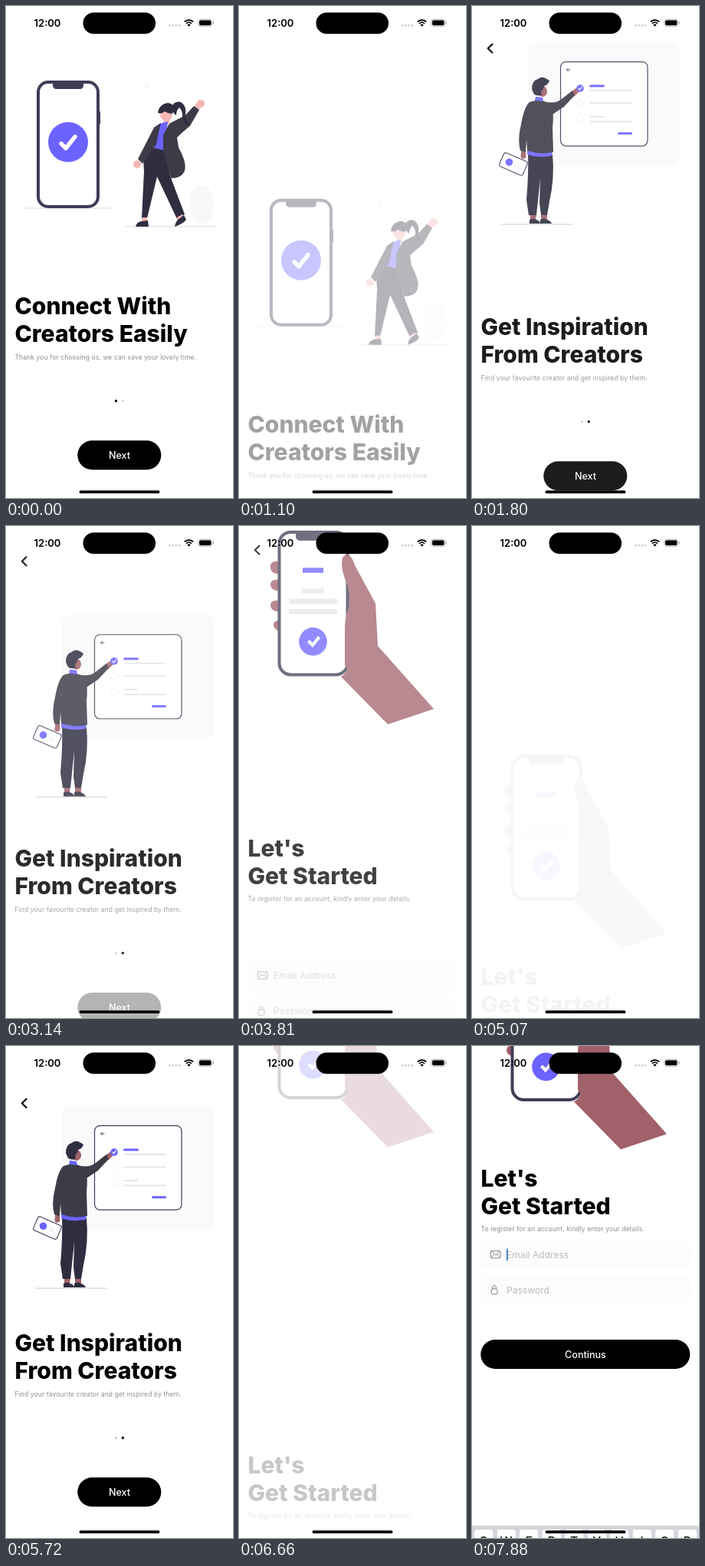
Animation of 296 by 640 pixels, one loop 7.99 s. Source, as an HTML page with a canvas:

```html
<!DOCTYPE html>
<html lang="en">
<head>
<meta charset="utf-8">
<title>Onboarding</title>
<style>
  html, body { margin: 0; width: 100%; height: 100%; overflow: hidden; background: #fff; }
  canvas { display: block; width: 296px; height: 640px; }
</style>
</head>
<body>
<canvas id="stage"></canvas>
<script>
const W = 296, H = 640, LOOP = 7990;
const FONT = 'Inter, "Liberation Sans", sans-serif';
const VIOLET = '#6c63ff', SLATE = '#3f3d56', NIGHT = '#2f2e41', COAT = '#3d3b47';
const PINK = '#f6b6b6', SKIN = '#a0616a', PALE = '#e6e6e6', FAINT = '#f8f8f8';

const scale = Math.max(1, window.devicePixelRatio || 1);
const stage = document.getElementById('stage');
const scratch = document.createElement('canvas');
for (const c of [stage, scratch]) { c.width = W * scale; c.height = H * scale; }
const screen = stage.getContext('2d'), g = scratch.getContext('2d');

// Shape helpers
function shape(d, fill) { g.fillStyle = fill; g.fill(new Path2D(d)); }
function line(d, color, width = 1) {
  g.strokeStyle = color; g.lineWidth = width; g.lineCap = g.lineJoin = 'round';
  g.stroke(new Path2D(d));
}
function box(x, y, w, h, r, fill, stroke, width = 1) {
  g.beginPath(); g.roundRect(x, y, w, h, r);
  if (fill) { g.fillStyle = fill; g.fill(); }
  if (stroke) { g.strokeStyle = stroke; g.lineWidth = width; g.stroke(); }
}
function oval(x, y, rx, ry, fill) {
  g.beginPath(); g.ellipse(x, y, rx, ry, 0, 0, 7); g.fillStyle = fill; g.fill();
}
function dot(x, y, r, fill) { oval(x, y, r, r, fill); }
function text(s, x, y, size, weight, color, align = 'left', spacing = 0) {
  g.font = `${weight} ${size}px ${FONT}`;
  g.textAlign = align; g.letterSpacing = spacing + 'px'; g.fillStyle = color;
  g.fillText(s, x, y);
}

// Paints a group off screen so that it fades as one
function layer(draw, dy = 0, alpha = 1) {
  if (alpha <= 0.004) return;
  g.setTransform(1, 0, 0, 1, 0, 0);
  g.clearRect(0, 0, scratch.width, scratch.height);
  g.setTransform(scale, 0, 0, scale, 0, dy * scale);
  draw();
  screen.globalAlpha = Math.min(1, alpha);
  screen.drawImage(scratch, 0, 0);
  screen.globalAlpha = 1;
}

function woman() {
  dot(184, 104, 4, FAINT); dot(154, 189, 2, FAINT); dot(252, 180, 2.5, FAINT);
  oval(255, 258, 16, 25, FAINT);
  line('M156 287H273M23 263H140', '#ccc', 0.7);
  box(120, 137, 3, 17, 1, SLATE);
  box(42, 99, 78, 162, 13, '#fff', SLATE, 4);
  shape('M61 98H101V103Q101 108 96 108H66Q61 108 61 103Z', SLATE);
  dot(81, 177, 26, VIOLET);
  line('M72 179L78 185L90 170', '#fff', 5.4);

  dot(254, 127, 5, PINK);
  shape('M246 129L252 123L257 130L249 136Z', PINK);
  dot(171, 206, 5, PINK);
  shape('M206 145L213 145L213 153L205 154Z', PINK);
  shape('M183 183L207 186L214 221L233 271L223 277L197 222L184 276L177 276L180 215Q178 195 183 183Z', NIGHT);
  shape('M178 275H184V281H177Z M223 275L230 271L232 276L224 280Z', PINK);
  shape('M169 287Q170 281 177 280L185 279L186 287Z M220 287Q221 281 224 278L232 272L235 278Q230 284 220 287Z', NIGHT);
  shape('M201 153L211 150L207 188L191 184Z', VIOLET);
  shape('M213 153L234 142L245 130L252 135L240 156Q229 165 223 171L225 184Q236 204 233 214Q230 224 215 224L205 188L205 168Z', COAT);
  shape('M202 152L193 158L172 199L178 205L196 180L199 164Z', COAT);
  oval(209, 142, 8, 7, PINK);
  shape('M198 139Q199 128 211 126Q218 127 220 133L217 140Q211 140 207 137Q203 141 198 139Z', NIGHT);
  shape('M216 131Q220 123 228 125Q236 130 234 142Q235 150 240 154Q233 157 230 146Q231 137 226 132Q222 136 222 142Q218 141 216 131Z', NIGHT);
}

function teacher() {
  box(72, 77, 200, 162, 12, '#fafafa');
  line('M39 315H131', '#bbb', 0.8);
  box(115.5, 103.5, 113.5, 109.5, 7, '#fff', SLATE, 1.2);
  line('M128 114H123.5M125.5 112L123.5 114L125.5 116', SLATE, 0.9);
  for (const y of [158, 178]) {
    g.beginPath(); g.arc(141, y, 4.6, 0, 7); g.strokeStyle = '#eee'; g.lineWidth = 0.7; g.stroke();
  }
  box(153, 133.4, 20, 3, 1.5, VIOLET);
  box(190, 195.2, 19, 3, 1.5, VIOLET);
  for (const [y, w] of [[141, 55], [157.5, 55], [175, 19], [181.5, 55]]) box(153.5, y - 1, w, 2, 1, PALE);

  shape('M76 300H84L83 310H76Z M90 300H98L98 310H90Z', SKIN);
  shape('M75 314V309Q79 306 84 309Q89 311 89 314Z M89 314V309Q94 306 98 309Q103 311 104 314Z', NIGHT);
  shape('M73 221L105 224Q108 255 101 285L98 303H90L88 288L89 255L84 303H74L71 283Q74 250 73 221Z', NIGHT);
  shape('M72 219L105 219L104 226Q85 229 72 224Z', VIOLET);
  shape('M64 216H70L70 227Q67 231 64 228Z', SKIN);
  g.save(); g.translate(54, 236.5); g.rotate(0.41);
  box(-16.7, -9.7, 33.4, 19.4, 3, '#fff', SLATE, 1.1);
  dot(-6, 0, 4.8, VIOLET);
  line('M2 -1H9M2 2H12', PALE, 0.8);
  g.restore();
  dot(67, 226, 3.6, SKIN);
  shape('M130 142L137 137L144 139L139 143L133 149Z', SKIN);
  shape('M99 156Q109 158 117 152L131 141L134 147L120 162L105 172Z', COAT);
  shape('M75 156Q84 153 91 154L104 158Q107 175 105 190L106 221Q89 225 72 219L71 205L70 221L63 219Q59 205 64 185Q68 162 75 156Z', COAT);
  shape('M82 154L83 149L92 150L93 155Z', VIOLET);
  oval(92, 142, 6, 7, SKIN);
  shape('M78 139Q78 128 86 126Q90 122 96 125L101 128Q99 134 94 135Q93 140 90 142L91 147Q82 149 80 144Z', NIGHT);
  dot(141, 138, 4.8, VIOLET);
  line('M139 138L140.6 140L143.4 136', '#fff', 1.2);
}

function phoneInHand() {
  for (const [x, y, h] of [[41, 110, 16], [41, 134, 14], [41, 161, 14], [45, 187, 13]])
    box(x, y, 18, h, [6, 2, 2, 8], SKIN);
  box(141, 150, 3, 22, 1, SLATE);
  box(52.5, 72, 89, 185.5, 15, '#fff', SLATE, 4);
  shape('M74 72H120V77Q120 83 114 83H80Q74 83 74 77Z', SLATE);
  box(83, 118.5, 27, 6.5, 0, VIOLET);
  box(82, 145.5, 29, 6, 0, PALE);
  box(65, 158.5, 63, 6.5, 0, PALE);
  box(65, 172, 63, 6.5, 0, PALE);
  dot(96.5, 214.5, 18.3, VIOLET);
  g.lineCap = 'butt';
  shape('M89 215L92 212L96 216L103 207L106 210L96 222Z', '#fff');
  shape('M134 112Q134 101 142 101Q147 103 151 115L178 165L181 220L254 302L194 322L133 260Q140 256 141 249L138 245V195Q138 185 143 170Q145 152 141 140Q134 124 134 112Z', SKIN);
}

function heading(a, b, y) {
  text(a, 11.5, y, 30, 800, '#000');
  text(b, 11.5, y + 36, 30, 800, '#000');
}
function note(s, y) { text(s, 11.5, y, 8.5, 400, '#8e8e8e', 'left', 0.12); }
function intro(a, b, sub, active) {
  heading(a, b, 401);
  note(sub, 460);
  [143.4, 152.3].forEach((x, i) => dot(x, 513.8, i === active ? 1.7 : 1.4, i === active ? '#000' : '#c4c4c4'));
}
function pill(label, x, w, y) {
  box(x, y, w, 38, 19, '#000');
  text(label, 148, y + 23.6, 12.6, 500, '#fff', 'center');
}
function chevron() { line('M26.5 -5.5L20.8 0L26.5 5.5', '#000', 2.2); }

function form(focused) {
  for (const y of [437, 483]) box(11.5, y, 273, 38, 10, '#fcfcfc');
  box(24.5, 451, 12.5, 9.5, 1.5, null, '#777', 0.9);
  line('M25 451.5L30.7 456.5L36.5 451.5M25 460L29 455.3M36.5 460L32.5 455.3', '#777', 0.8);
  box(25.3, 500.5, 7.6, 7, 1.5, null, '#777', 0.9);
  line('M26.8 500V498.5Q27 496 29.1 496Q31.2 496 31.4 498.5V500', '#777', 0.9);
  text('Email Address', 45, 460.4, 12.1, 400, '#bcbcbc');
  text('Password', 45, 506.4, 12.1, 400, '#bcbcbc');
  if (focused) box(45, 448, 1.6, 16, 0.8, '#2f6fd0');
}

function keyboard() {
  box(0, 624, W, 40, 0, '#d3d6dc');
  [...'QWERTYUIOP'].forEach((key, i) => {
    const x = 3 + i * 29.5;
    box(x, 630, 24.5, 32, 4, '#a0a3a8');
    box(x, 629, 24.5, 32, 4, '#fff');
    text(key, x + 12.2, 650, 16, 400, '#000', 'center');
  });
}

function statusBar() {
  box(100.5, 8.5, 94.5, 27.8, 13.9, '#000');
  text('12:00', 54, 26.5, 13, 600, '#000', 'center');
  for (let i = 0; i < 4; i++) dot(213.5 + i * 4.1, 25.2, 1.3, '#c8c8c8');
  g.lineCap = 'butt'; g.strokeStyle = '#000'; g.lineWidth = 1.9;
  for (const r of [8, 4.9]) {
    g.beginPath(); g.arc(238.5, 26.3, r, -Math.PI * 0.75, -Math.PI * 0.25); g.stroke();
  }
  shape('M238.5 26.8L236.4 24.4Q238.5 22.7 240.6 24.4Z', '#000');
  box(250.5, 17.2, 18.4, 9.4, 3, null, '#aaa', 0.8);
  box(251.9, 18.6, 15.6, 6.6, 1.9, '#000');
  box(269.8, 20.3, 1.2, 3.2, 0.6, '#aaa');
  box(95.5, 630.2, 105, 3.8, 1.9, '#000');
}

// Damped spring from 0 to 1, slightly overshooting
function spring(ms) {
  if (ms <= 0) return 0;
  const u = ms * 0.005;
  return 1 - Math.exp(-u) * (Math.cos(u) + Math.sin(u));
}

const FAR = 240, NEAR = 150;
const pages = [
  { art: woman, artY: 0, copy: () => intro('Connect With', 'Creators Easily', 'Thank you for choosing us, we can save your lovely time.', 0) },
  { art: teacher, artY: -4, back: 72, copy: () => intro('Get Inspiration', 'From Creators', 'Find your favourite creator and get inspired by them.', 1) },
  { art: phoneInHand, artY: -2, back: 70, form: true, copy: () => {
      heading("Let's", 'Get Started', 367.5);
      note('To register for an account, kindly enter your details.', 425.6);
    } }
];
const visits = [
  { page: 0, enter: -3000, press: 690, leave: 850 },
  { page: 1, enter: 1434, press: 2880, leave: 3042 },
  { page: 2, enter: 3520, press: 4340, leave: 4650, goBack: true },
  { page: 1, enter: 5220, press: 5810, leave: 5960 },
  { page: 2, enter: 6548, press: Infinity, leave: Infinity }
];
const FOCUS = 7870, LIFT = 185;

function show(v, t) {
  const p = pages[v.page];
  if (t < v.enter) return;
  const gone = spring(t - v.leave);
  if (t - v.leave > 471) return;
  const focused = t >= FOCUS, lift = focused ? -LIFT : 0;
  const pose = delay => {
    const left = 1 - spring(t - v.enter - delay);
    return { left, alpha: Math.min(1, 1 - left) * (1 - gone) };
  };
  const now = pose(0), late = pose(p.form ? 100 : 0);
  const pressed = 1 - 0.65 * Math.min(1, Math.max(0, (t - v.press) / 120));
  const down = FAR * (now.left + gone) + lift;
  const lateDown = FAR * (late.left + gone) + lift;

  layer(p.art, p.artY + FAR * (gone - now.left) + lift, now.alpha);
  layer(p.copy, down, now.alpha);
  if (p.form) layer(() => form(focused), lateDown, late.alpha);
  layer(() => p.form ? pill('Continus', 11.3, 273, 566.5) : pill('Next', 93.3, 109, 565.3),
    lateDown, late.alpha * (v.goBack ? 1 : pressed));
  if (p.back)
    layer(chevron, p.back - NEAR * (now.left + gone) + lift, now.alpha * (v.goBack ? pressed : 1));
}

function render(t) {
  screen.fillStyle = '#fff';
  screen.fillRect(0, 0, stage.width, stage.height);
  for (const v of visits) show(v, t);
  if (t >= FOCUS) layer(keyboard);
  layer(statusBar);
}

const start = performance.now();
function tick() {
  render((performance.now() - start) % LOOP);
  requestAnimationFrame(tick);
}
tick();
</script>
</body>
</html>
```
